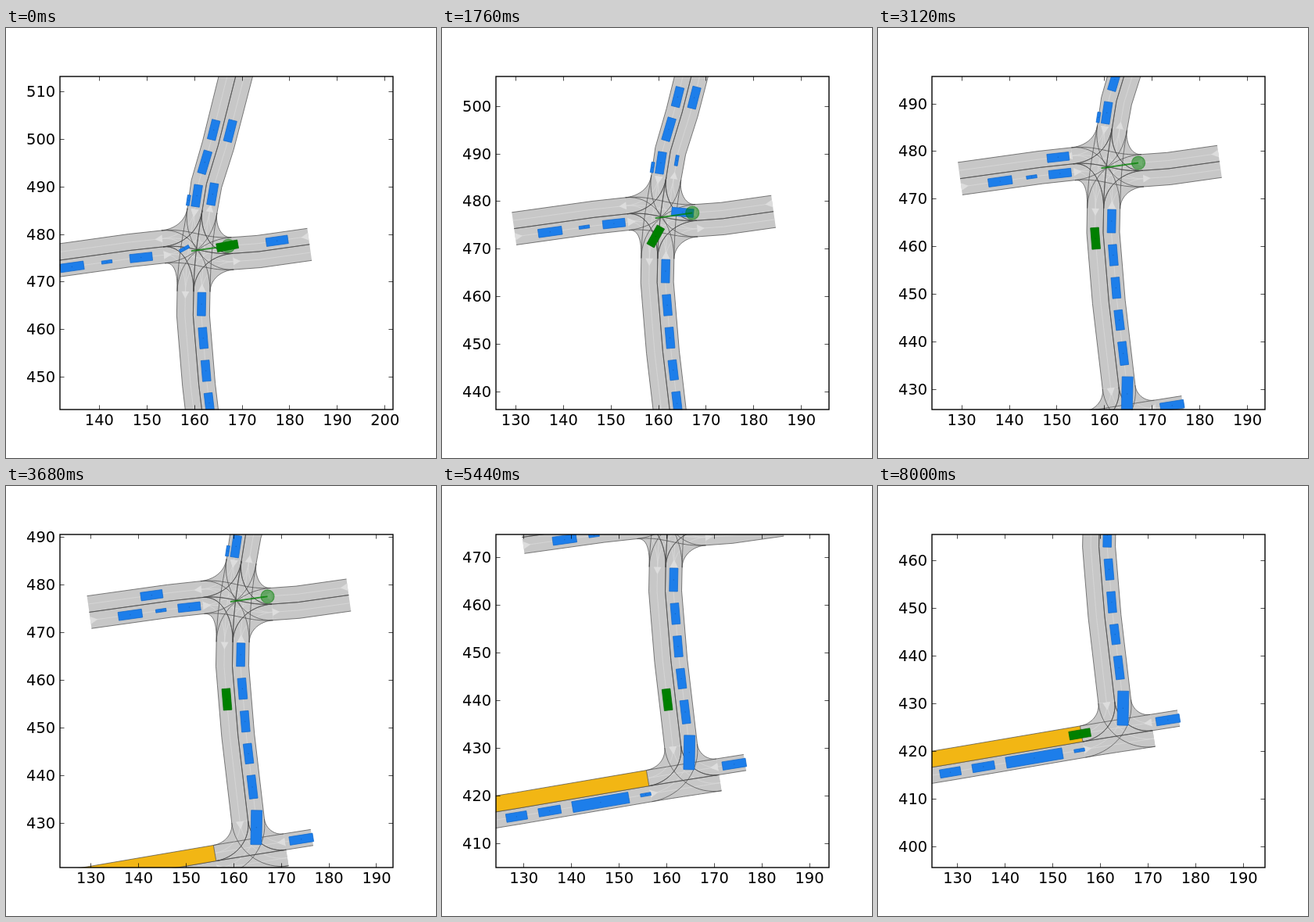
Recreate the animation shown at these times as an HTML page with a canvas. Size 550x550 px, loop 8.08 s.

```html
<!DOCTYPE html>
<html lang="en">
<head>
<meta charset="utf-8">
<title>Traffic junctions</title>
<style>
html, body { margin: 0; width: 100%; height: 100%; overflow: hidden; background: #fff; }
canvas { display: block; }
</style>
</head>
<body>
<canvas id="stage" width="550" height="550"></canvas>
<script>
const ctx = document.getElementById('stage').getContext('2d');
const STEP = 80, STEPS = 101;
const SPAN = 70, SIZE = 426.25, LEFT = 68.75, TOP = 61.875;
const SCALE = SIZE / SPAN, MIDDLE_X = LEFT + SIZE / 2, MIDDLE_Y = TOP + SIZE / 2;
const CAR = 4.6, BIKE = 2.2, GAP = 2.5;

// Key poses: step, view centre x and y, distance driven by the green car
const journey = [
  [0, 166.68, 478.2, 1], [22, 160.8, 471.28, 10.25], [31, 159.33, 466.3, 15.2],
  [46, 158.45, 455.65, 27.2], [68, 159.1, 439.9, 43.1], [84, 159.5, 432.87, 55.1],
  [100, 159.58, 430.6, 62.7]
];

// Monotone cubic interpolation of one column of the key poses
function pose(column, step) {
  const last = journey.length - 1;
  const secant = k => (journey[k + 1][column] - journey[k][column])
    / (journey[k + 1][0] - journey[k][0]);
  const slope = k => {
    if (k === 0 || k === last) return secant(k && k - 1);
    const a = secant(k - 1), b = secant(k);
    return a * b > 0 ? 2 * a * b / (a + b) : 0;
  };
  let i = 0;
  while (i < last - 1 && step >= journey[i + 1][0]) i++;
  const start = journey[i], end = journey[i + 1];
  const h = end[0] - start[0], u = (step - start[0]) / h;
  return start[column] + (end[column] - start[column]) * u * u * (3 - 2 * u)
    + h * u * (1 - u) * (slope(i) * (1 - u) - slope(i + 1) * u);
}

const angle = (p, q) => Math.atan2(q[1] - p[1], q[0] - p[0]);
const distance = (p, q) => Math.hypot(q[0] - p[0], q[1] - p[1]);
const move = (p, a, d) => [p[0] + d * Math.cos(a), p[1] + d * Math.sin(a)];
const mix = (p, q, u) => [p[0] + (q[0] - p[0]) * u, p[1] + (q[1] - p[1]) * u];

const makeLane = (left, right) =>
  ({ left, right, center: left.map((p, i) => mix(p, right[i], 0.5)) });

// A road is its dividing line, listed from the junction outwards, plus lane widths at both ends
function makeRoad(mid, near = 3.45, far = near) {
  const last = mid.length - 1;
  const side = sign => mid.map((p, i) => {
    const heading = angle(mid[Math.max(i - 1, 0)], mid[Math.min(i + 1, last)]);
    return move(p, heading + sign * Math.PI / 2, near + (far - near) * i / last);
  });
  const left = side(1), right = side(-1);
  return {
    inbound: makeLane([...mid].reverse(), [...left].reverse()),
    outbound: makeLane(mid, right),
    start: { mid: mid[0], in: left[0], out: right[0], heading: angle(mid[1], mid[0]) },
    end: { mid: mid[last], in: right[last], out: left[last],
      heading: angle(mid[last - 1], mid[last]) }
  };
}

// Curve that leaves p along one heading and reaches q against the heading of its road
function bend(p, headingP, q, headingQ) {
  const reach = 0.39 * distance(p, q);
  const a = move(p, headingP, reach), b = move(q, headingQ, reach);
  return Array.from({ length: 19 }, (_, i) => {
    const u = i / 18, ab = mix(a, b, u);
    return mix(mix(mix(p, a, u), ab, u), mix(ab, mix(b, q, u), u), u);
  });
}
const crossing = (a, b) => makeLane(
  bend(a.mid, a.heading, b.mid, b.heading), bend(a.in, a.heading, b.out, b.heading));
const crossings = ports =>
  ports.flatMap(a => ports.filter(b => b !== a).map(b => crossing(a, b)));

const west = makeRoad([[153.4, 477.4], [146.5, 476.65], [129.65, 474.3]]);
const north = makeRoad([[161.6, 485], [162.5, 490.6], [164.95, 498.7], [170.1, 519]], 3.15, 3.5);
const east = makeRoad([[168, 476], [173.5, 476.4], [184.15, 477.9]], 3.4);
const south = makeRoad([[159.8, 468], [159.7, 463], [160, 459.3], [160.9, 448.4], [163, 430.5]]);
const lowerWest = makeRoad([[156.3, 422.05], [129, 417.4], [118, 415.6]], 3.35);
const lowerEast = makeRoad([[171, 424.4], [176.7, 425.3]], 3.4);

const lanes = [
  ...[west, north, east, south].flatMap(road => [road.inbound, road.outbound]),
  lowerWest.inbound, lowerEast.inbound,
  ...crossings([west.start, north.start, east.start, south.start]),
  ...crossings([lowerWest.start, lowerEast.start, south.end])
];

function makeRoute(...parts) {
  const lengthOf = points =>
    points.slice(1).reduce((sum, p, i) => sum + distance(points[i], p), 0);
  const points = parts.flatMap(lane => lane.center);
  return { points, length: lengthOf(points), entry: lengthOf(parts[0].center) };
}

function locate({ points }, travelled) {
  for (let i = 1; i < points.length; i++) {
    const d = distance(points[i - 1], points[i]);
    if (d > 0 && travelled <= d)
      return { p: mix(points[i - 1], points[i], travelled / d), heading: angle(points[i - 1], points[i]) };
    travelled -= d;
  }
  return null;
}

// Vehicles standing nose to tail before the end of a route; rolling ones still close up
function queue(route, lengths, { stop = 0.4, side = 0, rolling = false } = {}) {
  let front = route.length - stop;
  return lengths.map((length, k) => {
    const rest = front - length / 2;
    front -= length + GAP;
    const lag = step => rolling ? (1.9 + 1.3 * k) * Math.exp(-step / (5 * 2 ** k)) : 0;
    return { route, length, side, travelled: step => rest - lag(step) };
  });
}
// Drives on from a point given relative to the junction entry
const driver = (route, length, from, speed, acceleration = 0) => ({
  route, length,
  travelled: step => route.entry + from + speed * step + acceleration * step * step
});

const northbound = makeRoute(west.inbound, crossing(west.start, north.start), north.outbound);
const westbound = makeRoute(east.inbound, crossing(east.start, west.start), west.outbound);
const southIn = makeRoute(crossing(lowerWest.start, south.end), south.inbound);
const egoRoute = makeRoute(east.inbound, crossing(east.start, south.start), south.outbound,
  crossing(south.end, lowerWest.start), lowerWest.outbound);

const traffic = [
  ...queue(southIn, [4.9, 4.4, 4.4, 4.2, 4.9, 7.2], { stop: 0.15 }),
  ...queue(makeRoute(north.inbound), [CAR, 4.9, 4.2], { stop: 0.6 }),
  ...queue(makeRoute(north.inbound), [BIKE], { stop: 0.6, side: -1.6 }),
  ...queue(makeRoute(west.inbound), [4.7, BIKE, 5], { stop: 0.6, rolling: true }),
  ...queue(makeRoute(lowerWest.inbound), [BIKE, 12, 4.7, 4.4], { stop: -0.1 }),
  ...queue(makeRoute(lowerEast.inbound), [5], { stop: 1 }),
  driver(northbound, BIKE, 4.5, 0.62),
  driver(northbound, CAR, 18, 0.63),
  driver(northbound, CAR, 31.8, 0.63),
  driver(westbound, CAR, -9.5, 0.38, 0.0082)
];
const ego = {
  route: egoRoute, length: 4.5,
  travelled: step => egoRoute.entry + pose(3, step)
};

function trace(points) {
  ctx.beginPath();
  points.forEach(p => ctx.lineTo(...p));
}
function line(points, color, width) {
  trace(points);
  ctx.strokeStyle = color;
  ctx.lineWidth = width / SCALE;
  ctx.stroke();
}
function fillLane(lane, color) {
  trace([...lane.left, ...[...lane.right].reverse()]);
  ctx.fillStyle = color;
  ctx.fill();
}
function borders(lane) {
  line(lane.left, '#484848', 0.7);
  line(lane.right, '#484848', 0.7);
}
function arrow([p, q]) {
  const a = angle(p, q);
  trace([move(p, a + Math.PI / 2, 0.8), move(p, a, 1.55), move(p, a - Math.PI / 2, 0.8)]);
  ctx.fillStyle = '#dddddd';
  ctx.fill();
}
function disc(p, radius, color) {
  ctx.beginPath();
  ctx.arc(...p, radius, 0, 2 * Math.PI);
  ctx.fillStyle = color;
  ctx.fill();
}

function drawRoads() {
  lanes.forEach(lane => fillLane(lane, '#c7c7c7'));
  lanes.forEach(lane => line(lane.center, '#d9d9d9', 0.8));
  lanes.forEach(borders);
  lanes.forEach(lane => arrow(lane.center));
  const goal = lowerWest.outbound;
  fillLane(goal, '#f2b614');
  borders(goal);
  line([goal.left[0], goal.right[0]], '#484848', 0.7);
}

function drawVehicle({ route, length, side = 0, travelled }, step, center, fill, edge) {
  const place = locate(route, travelled(step));
  if (!place) return;
  const p = move(place.p, place.heading + Math.PI / 2, side);
  // Only vehicles whose centre lies in the window are shown
  if (p.some((v, axis) => Math.abs(v - center[axis]) > SPAN / 2)) return;
  const width = length < 3 ? 0.65 : length > 6 ? 2.3 : 1.75;
  ctx.save();
  ctx.translate(...p);
  ctx.rotate(place.heading);
  ctx.beginPath();
  ctx.rect(-length / 2, -width / 2, length, width);
  ctx.fillStyle = fill;
  ctx.fill();
  ctx.strokeStyle = edge;
  ctx.lineWidth = 0.7 / SCALE;
  ctx.stroke();
  disc([0, 0], 0.7 / SCALE, edge);
  ctx.restore();
}

function drawStartMarker() {
  const start = [167.1, 477.6];
  line([[159.3, 476.5], start], 'rgba(0,128,0,.75)', 2);
  disc(start, 1.4, 'rgba(0,128,0,.5)');
  ctx.strokeStyle = 'rgba(0,128,0,.5)';
  ctx.lineWidth = 1.2 / SCALE;
  ctx.stroke();
}

function drawAxes([cx, cy]) {
  const tick = 5.55, low = 69, high = 495, top = 62, bottom = 488;
  ctx.strokeStyle = ctx.fillStyle = '#000';
  ctx.font = '19.44px "DejaVu Sans", sans-serif';
  ctx.lineWidth = 0.7;
  ctx.beginPath();
  const mark = (x, y, dx, dy) => { ctx.moveTo(x, y); ctx.lineTo(x + dx, y + dy); };
  const eachTick = (center, paint) => {
    for (let v = Math.ceil((center - SPAN / 2) / 10) * 10; v <= center + SPAN / 2; v += 10)
      paint(v, (v - center) * SCALE);
  };
  ctx.textAlign = 'center';
  eachTick(cx, (v, offset) => {
    const x = MIDDLE_X + offset, px = Math.floor(x) + 0.5;
    mark(px, bottom, 0, -tick);
    mark(px, top, 0, tick);
    ctx.fillText(v, x, 508);
  });
  ctx.textAlign = 'right';
  eachTick(cy, (v, offset) => {
    const y = MIDDLE_Y - offset, py = Math.floor(y) + 0.5;
    mark(low, py, tick, 0);
    mark(high, py, -tick, 0);
    ctx.fillText(v, 63.2, Math.round(y + 6.5));
  });
  ctx.stroke();
  ctx.lineWidth = 1.39;
  ctx.strokeRect(low, top, high - low, bottom - top);
}

function draw(step) {
  const center = [pose(1, step), pose(2, step)];
  ctx.fillStyle = '#fff';
  ctx.fillRect(0, 0, 550, 550);
  ctx.save();
  ctx.beginPath();
  ctx.rect(LEFT, TOP, SIZE, SIZE);
  ctx.clip();
  ctx.translate(MIDDLE_X, MIDDLE_Y);
  ctx.scale(SCALE, -SCALE);
  ctx.translate(-center[0], -center[1]);
  drawRoads();
  traffic.forEach(car => drawVehicle(car, step, center, '#1d7eea', '#1468c8'));
  drawVehicle(ego, step, center, '#008000', '#006c00');
  drawStartMarker();
  ctx.restore();
  drawAxes(center);
}

function animate() {
  draw(Math.floor(performance.now() / STEP) % STEPS);
  requestAnimationFrame(animate);
}
animate();
</script>
</body>
</html>
```
